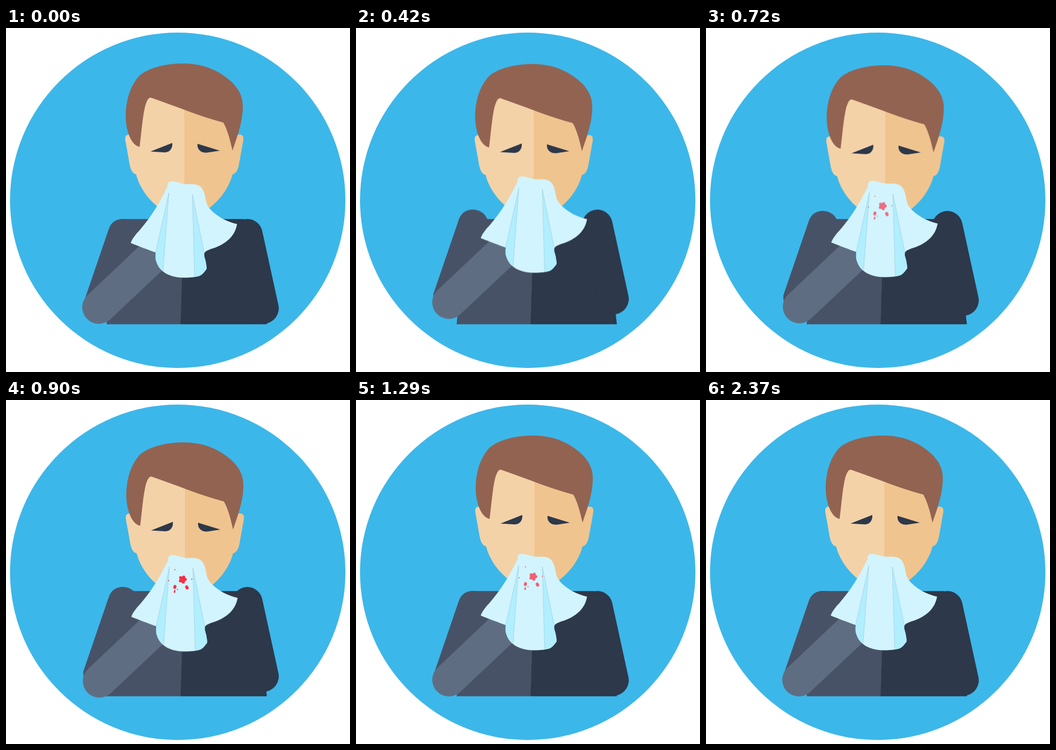
Write an HTML page that moves like this. It is 600 px wide and 600 px high and loops after 2440 ms.

```html
<!DOCTYPE html>
<html lang="en">
<head>
<meta charset="utf-8">
<title>Sneeze</title>
<style>
  html, body { margin: 0; width: 100%; height: 100%; overflow: hidden; background: #fff; }
  svg { display: block; width: 100vw; height: 100vh; }
  .dark { fill: #2d384a; }
  .coat { fill: #485266; }
  .skin { fill: #f3d2a8; }
  .shade { fill: #f0c48e; }
  .fold { fill: #b1eefe; }
  .crease { fill: none; stroke: #5f95a6; stroke-width: .5; stroke-opacity: .5; }
  .spot { stroke: #f92d45; stroke-linecap: round; fill: none; }

  .arm, .head, .cloth, .spots { animation: 2440ms linear infinite; }
  .arm { animation-name: shrug; }
  .head { animation-name: nod; }
  .cloth { animation-name: wave; }
  .spots { animation-name: stain; }

  /* Motion fills the first 1080 ms (44.26%); its midpoint is 22.13%. */
  @keyframes shrug {
    0%, 44.26%, 100% { transform: none; }
    22.13% { transform: translateY(-21px); }
  }
  @keyframes nod {
    0%, 44.26%, 100% { transform: none; }
    10.45% { transform: translateY(-21px); }
    17.62% { transform: translate(-1px, 2px); }
    22.13% { transform: translate(2.5px, -6px); }
    36.89% { transform: translate(1px, 12px); }
  }
  @keyframes wave {
    0% { transform: none; }
    22.13% { transform: translateY(-11px); }
    29.51% { transform: translate(1px, -1px); }
    37.7% { transform: translate(1px, 3.5px); }
    44.26%, 100% { transform: translateY(1px); }
  }
  @keyframes stain {
    0%, 22.13% { transform: translateX(-1px); opacity: 0; }
    33.2% { opacity: 1; }
    36.89% { transform: translate(-1px, 5px); opacity: 1; }
    44.26%, 100% { transform: none; }
    97.13%, 100% { opacity: 0; }
  }
</style>
</head>
<body>
<svg viewBox="0 0 600 600">
  <circle cx="299.5" cy="300.5" r="292.5" fill="#3cb7ea"/>

  <path class="coat" d="M310 333.300H205L180 470L175.500 516.800H305Z"/>
  <path class="dark" d="M310 333.300H415L452 490L455 516.800H304.500Z"/>

  <path class="arm coat" d="M179.500 350C183 340 191 333 204 333A27 27 0 0 1 229.500 369L186 495A27 27 0 0 1 135 480Z"/>
  <path class="arm dark" d="M421 333A27 27 0 0 1 446.700 353L475.300 484A27 27 0 0 1 422.700 496L395 366A27 27 0 0 1 421 333Z"/>

  <g class="head">
    <path class="skin" d="M311 110H238L228 186H213Q207 187 208 195L216 240Q219 254 227 255.500C235 288 268 327 311 332Z"/>
    <path class="shade" d="M311 125H384L394 186H409Q415 187 414 195L406 240Q403 254 395 255.500C387 288 354 327 311 332Z"/>
    <path fill="#926351" d="M233 207.500C217 204 207 175 209 145C211 118 219 99 232 84C248 69 280 62 309 62C335 62 357 68 378 82C396 94 413 111 413 136C413 160 407 180 395 214C391 195 386 177 379 165C340 155 295 136 254 122C248 119 245 130 243 135C238 155 236 185 233 207.500Z"/>
    <path class="dark" d="M252 215.500L290 200.500C291 208 287 217 277 217ZM334 202L373 214L350 217.500C340 218 333 212 334 202Z"/>
  </g>

  <g class="cloth">
    <path fill="#5f6d82" d="M142 466L232 381L265 380L285 411L182 508A29 29 0 1 1 142 466Z"/>
    <path fill="#d2f4fe" d="M282 276C281 270 284 267 291 267.500C299 268 308 273 318 272.500C335 271.500 343 275 347 292C349 303 350 310 358 318C369 329 385 338 403 342C400 360 388 374 365 383C355 386 347 389 346 393C344 398 349 402 350 420C345 427 341 432 335 433C328 435 318 435.500 308 435.500C290 435 268 428 262 407C260 402 261 396 261 391.500C248 387 230 380 217.500 375C220 368 226 360 232 354C253 330 269 303 282 276Z"/>
    <path class="fold" d="M284 288L261 391.500C260 405 264 416 274 423ZM325 290L346 393C344 398 349 402 350 420C345 427 341 432 335 433L329 434Z"/>
    <path class="crease" d="M261 391L284 288L274 423M346 393L325 290L329 433"/>
  </g>

  <g class="spots">
    <circle class="spot" cx="309" cy="308" r="4.800" stroke-width="5" stroke-dasharray="0 6.030"/>
    <circle cx="309" cy="308" r="5.500" fill="#f92d45"/>
    <path class="spot" stroke-width="5.200" d="M295.700 320.200l-.4 1.600M316 321l1 2"/>
    <path class="spot" stroke-width="2.600" d="M295.300 327.700l-.5 2.600"/>
    <path class="spot" stroke-width="2" d="M295.500 291h.01M284.500 310h.01M325 307.500h.01M300 325.500h.01"/>
  </g>
</svg>
</body>
</html>
```
